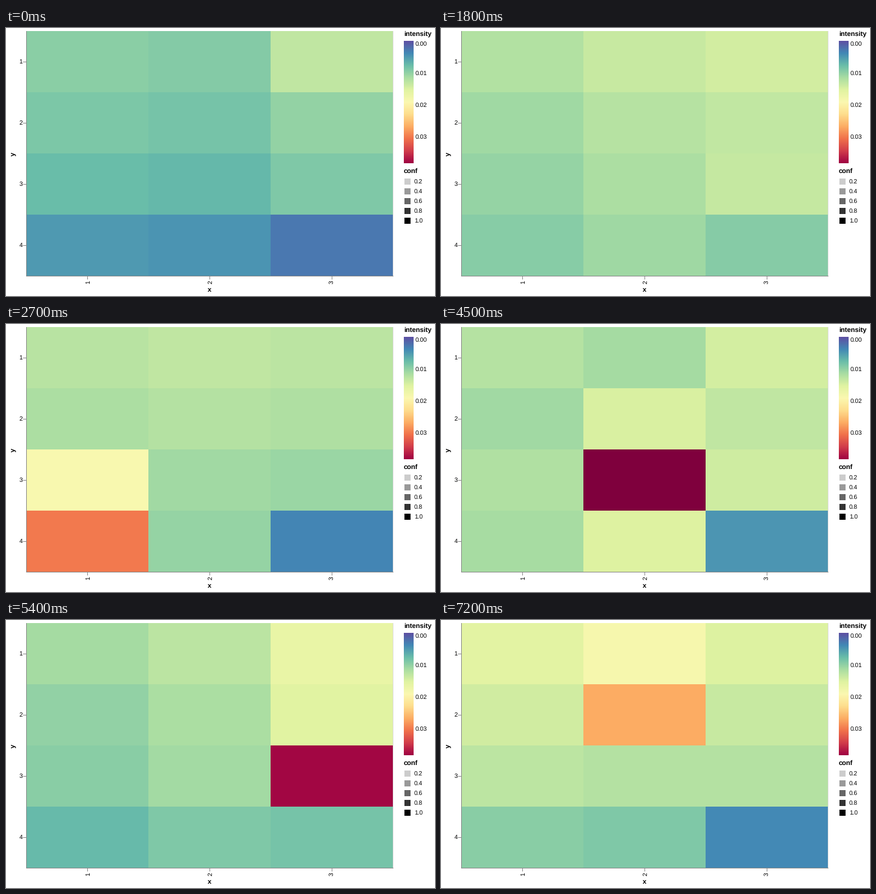
Write a matplotlib script that moves like this. It is 702 px wide and 438 px high and loops after 8 s.

```python
import matplotlib.pyplot as plt
import numpy as np
from matplotlib.animation import FuncAnimation
from matplotlib.patches import Rectangle

W, H, DPI = 702, 438, 64
LEFT, TOP, CELL_W, CELL_H = 33, 5, 200, 100
COLS, ROWS = 3, 4
STEP_MS, HOLD = 100, 9  # each state holds for 900 ms

plt.rcParams["font.family"] = "Liberation Sans"
plt.rcParams["text.hinting"] = "none"

ANCHORS = ("5e4fa2 4288b5 69bda9 a9dda2 e0f3a1 fbf8b0 "
           "fedd8d fcac63 f0704a d13c4b 9e0142").split()
RGB = np.array([[int(h[i:i + 2], 16) for i in (0, 2, 4)] for h in ANCHORS]) / 255


def spectral(p):
    """Piecewise linear colour, extrapolated past the last anchor."""
    i = min(max(int(p), 0), len(RGB) - 2)
    return np.clip(RGB[i] + (p - i) * (RGB[i + 1] - RGB[i]), 0, 1)


def field(levels, left, right):
    """A level per row, shifted in the outer columns."""
    return np.add.outer(levels, [left, 0, right])


def spots(base, marks):
    """Copy of a field with a few standout cells."""
    grid = base.copy()
    for cell, value in marks.items():
        grid[cell] = value
    return grid


def blend(a, b, top):
    """Mean of two fields that shares its first row with a neighbour."""
    grid = (a + b) / 2
    grid[0] = top[0]
    return grid


# Intensity in anchor units
calm = spots(field([2.42, 2.20, 1.90, 1.23], 0.1, 0.45),
             {(0, 2): 3.42, (3, 2): 0.72})
rise = spots(field([3.67, 3.28, 3.25, 3.02], -0.6, 0.5),
             {(2, 2): 4.25, (3, 2): 2.32})
flat = field([3.42, 3.20, 2.87, 2.68], -0.15, -0.1)
corner = spots(flat, {(2, 0): 4.9, (3, 0): 7.85, (3, 2): 0.95})
ridge = field([4.22, 3.87, 4.13, 3.97], -1.0, -0.45)
peak = spots(ridge, {(0, 1): 2.93, (2, 1): 10.6, (3, 2): 1.25})
slope = field([3.33, 3.04, 2.90, 2.34], -0.4, 1.0)
edge = spots(slope, {(2, 2): 9.92, (3, 2): 2.2})
fade = field([3.95, 3.55, 3.20, 2.35], 0.15, 0)
warm = spots(fade, {(0, 1): 4.83, (1, 1): 7, (3, 2): 1.02})

STATES = [calm, rise, (rise + flat) / 2, corner, blend(flat, ridge, peak),
          peak, edge, blend(slope, fade, edge), warm]

fig = plt.figure(figsize=(W / DPI, H / DPI), dpi=DPI, facecolor="white")
ax = fig.add_axes([0, 0, 1, 1])
ax.axis("off")


def box(x, y, w, h, color, z=1):
    patch = Rectangle((x, y), w, h, facecolor=color, linewidth=0,
                      antialiased=False, zorder=z)
    return ax.add_patch(patch)


def label(x, y, text, size=10, ha="left", bold=False, rot=0):
    ax.text(x, y, text, fontsize=size * 72 / DPI, ha=ha, va="baseline",
            color="black", rotation=rot, rotation_mode="anchor",
            weight="bold" if bold else "normal")


right, bottom = LEFT + COLS * CELL_W, TOP + ROWS * CELL_H

# View outline, cells and axes
box(LEFT, TOP, right - LEFT + 1, bottom - TOP + 1, "#dddddd", 0)
cells = [box(LEFT + c * CELL_W, TOP + r * CELL_H, CELL_W, CELL_H, "white")
         for r in range(ROWS) for c in range(COLS)]
box(LEFT, TOP, 1, bottom - TOP + 1, "#888888", 2)
box(LEFT, bottom, right - LEFT + 1, 1, "#888888", 2)

for r in range(ROWS):
    y = TOP + (r + 0.5) * CELL_H
    box(LEFT - 5, y, 5, 1, "#888888", 2)
    label(LEFT - 6, y + 3.5, str(r + 1), ha="right")
for c in range(COLS):
    x = LEFT + (c + 0.5) * CELL_W
    box(x, bottom, 1, 6, "#888888", 2)
    label(x + 4, bottom + 7, str(c + 1), ha="right", rot=90)
label((LEFT + right) / 2, 431, "x", 11, "center", True)
label(16, (TOP + bottom) / 2 + 1, "y", 11, "center", True, 90)

# Intensity legend
label(651, 14, "intensity", 11, bold=True)
ramp = [[spectral((i + 0.5) / 20)] for i in range(200)]
ax.imshow(ramp, extent=(651, 667, 221, 21), interpolation="nearest",
          aspect="auto")
for i in range(4):
    label(670, max(25.2 + 52.4 * i, 29.6), f"{i / 100:.2f}")

# Confidence legend
label(651, 238, "conf", 11, bold=True)
for i in range(5):
    conf = (i + 1) / 5
    y = 251 + 16 * i
    box(652, y - 5, 10, 10, str(round(1 - conf, 1)))
    label(668, y + 3.5, f"{conf:.1f}")

ax.set_xlim(0, W)
ax.set_ylim(H, 0)


def update(frame):
    for cell, p in zip(cells, STATES[frame // HOLD].flat):
        cell.set_facecolor(spectral(p))
    return cells


anim = FuncAnimation(fig, update, frames=8000 // STEP_MS, interval=STEP_MS,
                     repeat=True, repeat_delay=0, blit=False)
plt.show()
```
